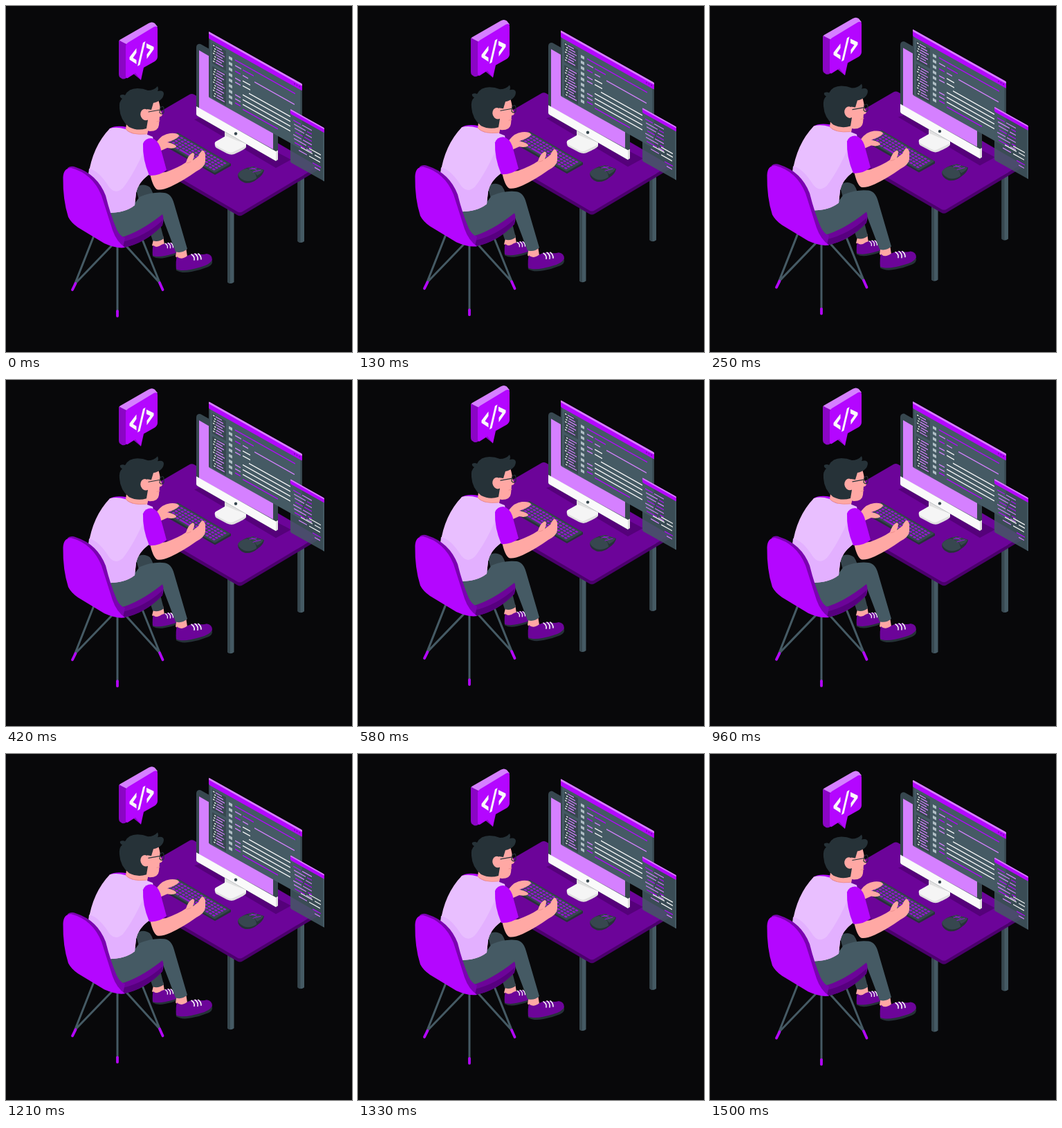
Animation of 500 by 500 pixels, one loop 1540 ms. Source, as an HTML page:

```html
<!DOCTYPE html>
<html lang="en">
<head>
<meta charset="utf-8">
<title>Developer at a desk</title>
<style>
  html, body { margin: 0; width: 100%; height: 100%; overflow: hidden; background: #08080a; }
  svg { display: block; width: 100%; height: 100%; }
</style>
</head>
<body>
<svg id="stage" viewBox="0 0 500 500"></svg>
<script>
const C = {
  main: '#b406ff', light: '#d580ff', deep: '#6c0499', dark: '#4b006c', rim: '#7a02b0', side: '#8b05c5',
  slate: '#455a64', ink: '#37474f', hair: '#263238', skin: '#ffa8a4', shade: '#f08f8e',
  shirt: '#e9bfff', fold: '#e3b0ff', white: '#fafafa', grey: '#e0e0e0'
};

const path = (d, fill) => `<path d="${d}" fill="${fill}"/>`;
const line = (d, color, w, cap = 'round') =>
  `<path d="${d}" fill="none" stroke="${color}" stroke-width="${w}" stroke-linecap="${cap}" stroke-linejoin="round"/>`;
const rect = (x, y, w, h, fill, r = 0) =>
  `<rect x="${x}" y="${y}" width="${w}" height="${h}" rx="${r}" fill="${fill}"/>`;
const group = (m, body) => `<g transform="matrix(${m})">${body}</g>`;
const dashes = (rows, h) =>
  rows.map(([v, a, b, c]) => rect(a, v, b - a, h, c, 0.5)).join('');

function desk() {
  const leg = (x, top, end) =>
    path(`M${x} ${top}h9.5v${end - top - 2}q-4.7 4-9.5 0z`, C.slate) +
    path(`M${x} ${top}h4v${end - top}q-2.5 0-4-2z`, C.ink);
  return leg(421.5, 240, 342) + leg(320, 285, 401) +
    path('M155 192L338 298L451 232V237L342 302Q338 304.500 334 302L155 198Z', C.dark) +
    path('M155 192L265 128Q268.500 126 272 128L451 232L342 297Q338 299.500 334 297Z', C.deep) +
    path('M272 164L290 158L412 222L390 234Z', '#55017a');
}

function monitor() {
  return path('M302 197L317 188L347 198V204Q346 207 330 214Q325 216 319 213L304 205Q301 203 302 197Z', C.grey) +
    path('M303 196L316 189V177L347 194V202L328 211Q324 213 319 210L304 202Q300 199 303 196Z', '#f5f5f5') +
    path('M316 177L347 194V199Q331 194 316 187Z', C.grey) +
    path('M275 60Q275 56 278 55Q280 54 283 56L393 118V222L390 224L275 158Z', C.ink) +
    path('M279 64L386 126V207L279 148Z', C.light) +
    path('M275 145L390 210V224L277 159Q275 158 275 156Z', C.white) +
    path('M390 210L393 208.500V222L390 224Z', C.grey) +
    '<circle cx="332" cy="184.500" r="2.200" fill="#37474f"/>';
}

function editor() {
  let s = rect(0, 4, 135, 91, C.slate, 1.5) + rect(0, 8, 2, 86, C.ink) + rect(132.5, 8, 2.5, 86, C.ink) +
    rect(0, 0, 135, 10, C.main, 1.5) + rect(0, 0, 135, 3, C.light, 1) +
    rect(5, 14, 20, 29, C.ink) + rect(5, 47, 20, 46, C.ink);
  for (let i = 0; i < 3; i++) s += rect(123 + i * 3.5, 5, 2, 2, C.rim, 1);
  for (let i = 0; i < 18; i++) {
    const v = i < 7 ? 15.5 + i * 3.8 : 49 + (i - 7) * 3.9;
    const a = 6 + (i * 5 % 3);
    s += dashes([[v, a, a + 2.5, C.white], [v, a + 3.8, 19 + (i * 7 % 5), C.light]], 1.4);
  }
  for (let i = 0; i < 9; i++) s += rect(29, 19 + i * 8, 5, 4.2, '#b0bec5');
  return group('1 .56 0 1 293 37', s + dashes([
    [19, 38, 125, C.main],
    [27, 38, 47, C.light], [27, 49, 65, C.main],
    [35, 38, 46, C.main], [35, 49, 57, C.light], [35, 66, 124, C.light],
    [43, 49, 60, C.white], [45, 38, 46, C.light],
    [50, 49, 60, C.white], [51, 38, 46, C.light],
    [56, 58, 118, C.white],
    [63, 49, 118, C.white], [69, 38, 46, C.light],
    [70, 49, 118, C.white], [75, 38, 46, C.light],
    [77, 49, 118, C.white], [81, 38, 46, C.main],
    [84, 49, 100, C.main]
  ], 1.5));
}

function panel() {
  let s = `<g opacity=".84">${rect(0, 3, 49, 74, C.slate, 1.5)}</g>` +
    rect(47, 6, 2, 71, C.slate) + rect(0, 0, 49, 7, C.main, 1.5) + rect(0, 0, 49, 2, C.light, 1);
  for (let i = 0; i < 7; i++) {
    const v = 13 + i * 5.2, a = 4 + i * 5 % 4, b = 15 + i * 7 % 9;
    s += dashes([[v, a, b, i % 3 ? C.light : C.main], [v, b + 2, 31 + i * 11 % 11, i % 2 ? C.main : C.light]], 1.3);
  }
  return group('1 .56 0 1 411 149', s + dashes([
    [41, 27, 44, C.white], [46, 15, 32, C.white], [46, 35, 44, C.white],
    [52, 12, 24, C.light], [52, 27, 43, C.white],
    [59, 32, 44, C.main], [64, 35, 43, C.light]
  ], 1.4));
}

function keyboard() {
  let keys = '';
  for (let r = 0; r < 5; r++) {
    for (let i = 0; i < 15; i++) {
      if (r === 4 && i > 3 && i < 9) continue;
      keys += rect(4 + i * 5.5, 2.6 + r * 4.5, 4, 3, '#9318d0', 0.5);
    }
    if (r === 4) keys += rect(26, 20.6, 26, 3, '#9318d0', 0.5);
  }
  return path('M225 197L248 183L325 228V231L302 244L225 200Z', C.hair) +
    group('.866 .506 -.866 .5 247.500 183', rect(0, 0, 89, 26.5, C.ink, 2) + keys);
}

function mouse() {
  return path('M335 244Q337 238 348 234L357 232L373 237Q372 244 363 250Q355 257 345 255.500Q335 252 335 244Z', C.hair) +
    path('M335 243Q338 237 348 235Q362 239 362 249Q353 255 344 252Q336 248 335 243Z', C.ink) +
    path('M349 234L356 232L372 237Q371 241 363 245Q358 238 349 234Z', C.ink) +
    line('M352 236L362 234M357 240L368 237M362 237L355 234', C.main, 0.8);
}

function shoe(x, y, k) {
  return `<g transform="translate(${x} ${y}) scale(${k})">` +
    path('M1 5Q-1 18 0 22Q8 27 22 24Q34 22 46 17Q53 14 52 8L30 8Z', C.hair) +
    path('M1 2Q7 8 16 1Q25-3 31-2Q38 0 44-2Q52-1 52 7Q48 14 36 17Q20 22 10 22Q3 22 0 20Q-1 8 1 2Z', C.deep) +
    line('M22-1Q27 2 26 7M27-2Q32 1 31 7M32-2Q36 1 36 6', C.white, 1.6) + '</g>';
}

function legs() {
  return path('M214 334L227 332L229 345Q220 352 211 346Z', C.skin) +
    shoe(212, 344, 0.82) +
    path('M187 262Q199 255 208 262Q214 270 215 285L228 336Q220 342 212 339L192 280Z', C.ink) +
    path('M247 350L260 349L262 362Q253 370 245 362Z', C.skin) +
    shoe(246, 360, 1) +
    path('M142 296Q170 298 187 284L193 276Q212 268 229 270Q239 271 243 286L262 351Q254 358 245 355L226 305Q210 330 160 340Z', C.slate);
}

function torso() {
  return path('M150 177Q158 172 175 175L170 186L144 186Z', C.main) +
    path('M174 170L207 172L204 186Q190 190 173 179Z', C.skin) +
    path('M150 177Q160 174 173 178Q180 187 202 185L212 189L222 240L206 244Q191 255 188 270L186 288Q172 299 148 299L119 245Q125 203 150 177Z', C.shirt) +
    line('M173 178Q181 187 202 185', C.shade, 1) +
    path('M120 235Q132 237 146 257Q156 275 169 263Q184 244 201 206L210 241Q191 254 188 270L186 288Q172 299 148 299L119 245Z', C.fold);
}

function arms() {
  const far = path('M218 196Q226 185 237 184Q247 183 250 187Q250 190 241 194L233 197Q247 200 246 204Q241 207 233 205L224 209Z', C.skin);
  const near = path('M208 242Q212 261 218 265Q224 267 238 261Q257 252 275 239Q287 233 288 225V214Q286 208 283 209Q280 212 278 217L270 223Q274 213 270 212Q264 214 260 226Q250 233 231 240Z', C.skin) +
    line('M261 227Q264 227 267 225', C.shade, 1);
  const sleeve = path('M198 199Q201 191 210 191Q219 193 223 204L232 237Q221 246 207 245Q197 221 198 199Z', C.main);
  return far + near + sleeve;
}

function head() {
  return path('M197 143L220 135Q223 145 223 150L226 157Q225 160 222 160L221 172Q220 181 208 181L194 178L192 160Z', C.skin) +
    path('M165 129Q169 127 172 129Q177 119 190 119Q198 119 205 122Q214 122 219 116Q221 120 219 123Q228 121 228 127Q227 137 213 140L210 150L204 149L205 165L203 177Q190 181 178 175Q165 165 164 148Q163 138 168 134Q164 132 165 129Z', C.hair) +
    path('M207 152Q201 146 196 151Q192 157 197 163Q201 167 206 164Z', C.skin) +
    line('M206 153L223 150M223 147Q228 143 228 149V154Q225 158 222 154Z', C.hair, 1.2) +
    line('M218 167L222 166', C.shade, 1);
}

function chairLegs() {
  return line('M127 332L99 403M155 344L101 400M172 345L222 400M196 335L223 402M161 346V443', C.slate, 3, 'butt') +
    line('M100.500 401L96 410M222 400L226.500 410M161 441V448', C.main, 3.8);
}

function chair() {
  return path('M164 335Q192 328 226 301Q229 307 226 317Q201 343 170 349Z', C.deep) +
    path('M168 341Q201 333 226 310V317Q201 343 170 349Z', '#57007f') +
    path('M89 234Q94 230 101 233Q132 243 144 274Q151 302 160 323Q165 333 172 335L169 349L150 330L90 240Z', C.rim) +
    path('M82.500 248Q83 234 94 234Q125 242 138 274Q147 302 154 324Q160 341 172 349Q160 351 142 343L104 320Q94 313 90 305Q82 280 82.500 248Z', C.main);
}

function bubble() {
  return path('M163 53Q163 49 166 48L206 25Q211 22 215 25L219 30L173 58Z', C.light) +
    path('M163 51Q164 49 166 51L174 55V104Q169 107 166 104Q163 103 163 98ZM184 98L196 91L195 107Z', C.side) +
    path('M173 58Q173 55 176 53L214 30Q219 28 219 33V73Q219 77 215 80L199 89L195 107L187 97L176 104Q173 105 173 101Z', C.main) +
    path('M188.500 61V67.500L183.500 75L188.500 78V84L178.500 77.500V74Z', C.white) +
    path('M203 54L213.500 59V62.500L203.500 76.500V70L208.500 63L203 60.500Z', C.white) +
    path('M198 53L201.500 51L193.500 85L190 87Z', C.white);
}

document.getElementById('stage').innerHTML =
  rect(0, 0, 500, 500, '#08080a') +
  '<g id="scene">' + desk() + monitor() + editor() + panel() + keyboard() + mouse() +
  legs() + torso() + arms() + head() + chairLegs() + chair() + '</g>' +
  '<g id="bubble">' + bubble() + '</g>';

const LOOP = 1540, HALF = LOOP / 2, PEAK = 705;
const scene = document.getElementById('scene');
const talk = document.getElementById('bubble');
const shift = (el, y) => el.setAttribute('transform', `translate(0 ${y.toFixed(2)})`);

// Steady rise and fall; the bubble travels about twice as far.
function draw(t) {
  const fromPeak = Math.abs((t - PEAK + HALF + LOOP) % LOOP - HALF);
  const d = fromPeak - PEAK;
  shift(scene, d * 0.0136);
  shift(talk, d * 0.0266);
}

const start = performance.now();
function tick() {
  draw((performance.now() - start) % LOOP);
  requestAnimationFrame(tick);
}
tick();
</script>
</body>
</html>
```
